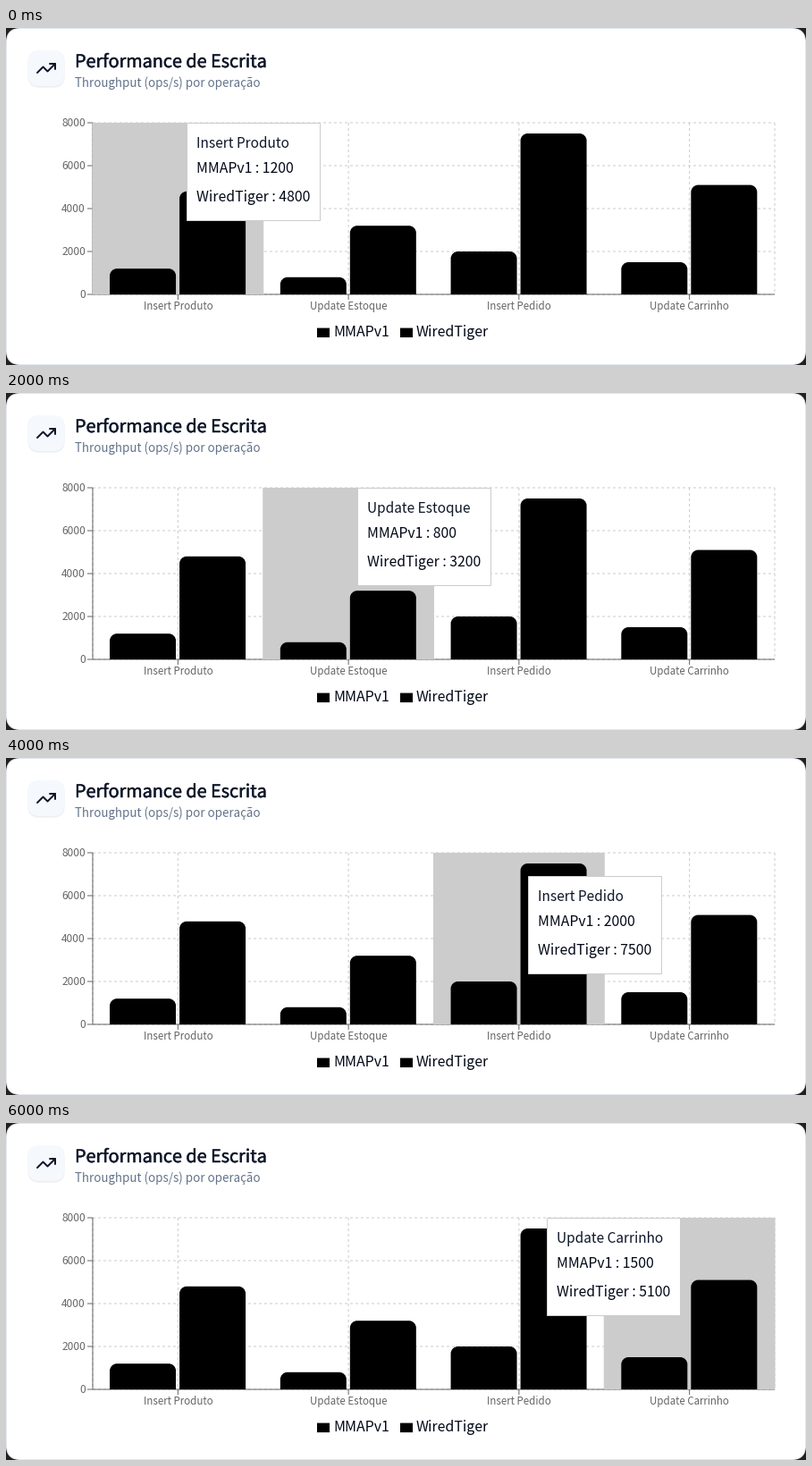
Recreate the animation shown at these times as a matplotlib script. Size 895 px wide and 377 px high, loop 8 s.

```python
import matplotlib.pyplot as plt
from matplotlib.animation import FuncAnimation
from matplotlib.patches import FancyBboxPatch, PathPatch, Rectangle
from matplotlib.path import Path
from matplotlib.patheffects import withStroke

W, H, DPI = 895, 377, 64
PX = 72 / DPI  # points per pixel

plt.rcParams["font.family"] = ["Noto Sans CJK JP", "DejaVu Sans"]

INK, DARK, MUTED = "#0f172a", "#020817", "#64748b"
AXIS, GRID = "#666666", "#cccccc"

LEFT, RIGHT, TOP, BOTTOM = 97, 860, 106, 298
Y_MAX = 8000
SERIES = ("MMAPv1", "WiredTiger")
DATA = [
    ("Insert Produto", 1200, 4800),
    ("Update Estoque", 800, 3200),
    ("Insert Pedido", 2000, 7500),
    ("Update Carrinho", 1500, 5100),
]
BAND = (RIGHT - LEFT) / len(DATA)
BAR_W, BAR_GAP, BAR_RADIUS = 74, 4, 8
TIP_W, TIP_H, TIP_OFFSET = 150, 110, 10
TIP_TOPS = (106, 106, 132, 106)

fig = plt.figure(figsize=(W / DPI, H / DPI), dpi=DPI, facecolor="#202020")
ax = fig.add_axes([0, 0, 1, 1])
ax.set_xlim(0, W)
ax.set_ylim(H, 0)
ax.axis("off")


def center(i):
    return LEFT + BAND * (i + 0.5)


def y_of(value):
    return BOTTOM - (BOTTOM - TOP) * value / Y_MAX


def line(xs, ys, color, z, width=1, **kw):
    ax.plot(xs, ys, color=color, lw=width * PX, zorder=z, snap=False,
            **{"solid_capstyle": "butt", **kw})


def text(x, y, s, size, color, z=6, **kw):
    return ax.text(x, y, s, fontsize=size * PX, color=color, zorder=z,
                   va="baseline", **kw)


def rounded(x, y, w, h, r, z, **kw):
    ax.add_patch(FancyBboxPatch(
        (x, y), w, h, boxstyle=f"round,pad=0,rounding_size={r}",
        zorder=z, snap=False, **kw))


def bar(x, value):
    y, r, x2 = y_of(value), BAR_RADIUS, x + BAR_W
    k = r * 0.4477  # circular arc as a cubic
    points = [(x, BOTTOM), (x, y + r), (x, y + k), (x + k, y), (x + r, y),
              (x2 - r, y), (x2 - k, y), (x2, y + k), (x2, y + r),
              (x2, BOTTOM), (x, BOTTOM)]
    codes = [Path.MOVETO, Path.LINETO] + [Path.CURVE4] * 3 + [Path.LINETO] \
        + [Path.CURVE4] * 3 + [Path.LINETO, Path.CLOSEPOLY]
    ax.add_patch(PathPatch(Path(points, codes), fc="black", lw=0, zorder=4,
                           snap=False))


def draw_header():
    rounded(0.5, 0.5, W - 1, H - 1, 15.5, 0, fc="white", ec="#e2e8f0", lw=PX)
    for grow in (1, 0.5, 0):
        rounded(25 - grow, 26 - grow, 40 + 2 * grow, 40 + 2 * grow, 12 + grow,
                0.5, fc=(0, 0, 0, 0.022), lw=0)
    rounded(25, 25, 40, 40, 12, 0.6, fc="#f5f9fd", lw=0)
    style = dict(width=2, solid_capstyle="round", solid_joinstyle="round")
    line([55, 46.5, 41.5, 35], [40, 48.5, 43.5, 50], INK, 1, **style)
    line([49, 55, 55], [40, 40, 46], INK, 1, **style)
    text(77, 44, "Performance de Escrita", 19.8, INK,
         path_effects=[withStroke(linewidth=0.45 * PX, foreground=INK)])
    text(77, 66, "Throughput (ops/s) por operação", 13.35, MUTED)


def draw_chart():
    dashed = dict(linestyle=(0, (3, 3)), dash_capstyle="butt")
    for value in range(0, Y_MAX + 1, 2000):
        y = y_of(value)
        line([LEFT, RIGHT], [y, y], GRID, 1, **dashed)
        line([LEFT - 6, LEFT], [y, y], AXIS, 2)
        text(LEFT - 8, y + 4, str(value), 11.9, AXIS, ha="right")
    for x in [LEFT, *map(center, range(len(DATA))), RIGHT]:
        line([x, x], [TOP, BOTTOM], GRID, 1, **dashed)
    line([LEFT, LEFT], [TOP, BOTTOM], AXIS, 2)
    line([LEFT, RIGHT], [BOTTOM, BOTTOM], AXIS, 2)

    for i, (name, *values) in enumerate(DATA):
        x = center(i)
        line([x, x], [BOTTOM, BOTTOM + 6], AXIS, 2)
        text(x, 315, name, 11.55, AXIS, ha="center")
        start = LEFT + BAND * (i + 0.1)
        for j, value in enumerate(values):
            bar(start + j * (BAR_W + BAR_GAP), value)

    for x, name in zip((348, 441), SERIES):
        ax.add_patch(Rectangle((x, 335.6), 14, 10.5, fc="black", lw=0,
                               zorder=4, snap=False))
        text(x + 18, 345, name, 15.9, DARK)


draw_header()
draw_chart()

cursor = ax.add_patch(Rectangle((0, TOP + 0.5), BAND, BOTTOM - TOP - 1,
                                fc=GRID, ec=GRID, lw=PX, zorder=3, snap=False))
tip = ax.add_patch(Rectangle((0, 0), TIP_W - 1, TIP_H - 1, fc="white",
                             ec=GRID, lw=PX, zorder=7, snap=False))
tip_label = text(0, 0, "", 15.4, INK, z=8)
tip_items = [text(0, 0, "", 15.8, DARK, z=8) for _ in SERIES]


def update(i):
    name, *values = DATA[i]
    cursor.set_x(center(i) - BAND / 2)
    x, y = center(i) + TIP_OFFSET, TIP_TOPS[i]
    if x + TIP_W > RIGHT:
        x = center(i) - TIP_OFFSET - TIP_W
    tip.set_xy((round(x) + 0.5, y + 0.5))
    tip_label.set_text(name)
    tip_label.set_position((x + 11, y + 28))
    for j, (item, series, value) in enumerate(zip(tip_items, SERIES, values)):
        item.set_text(f"{series} : {value}")
        item.set_position((x + 11, y + 56 + 32 * j))
    return [cursor, tip, tip_label, *tip_items]


anim = FuncAnimation(fig, update, frames=len(DATA), interval=2000,
                     repeat=True, repeat_delay=0)
plt.show()
```
